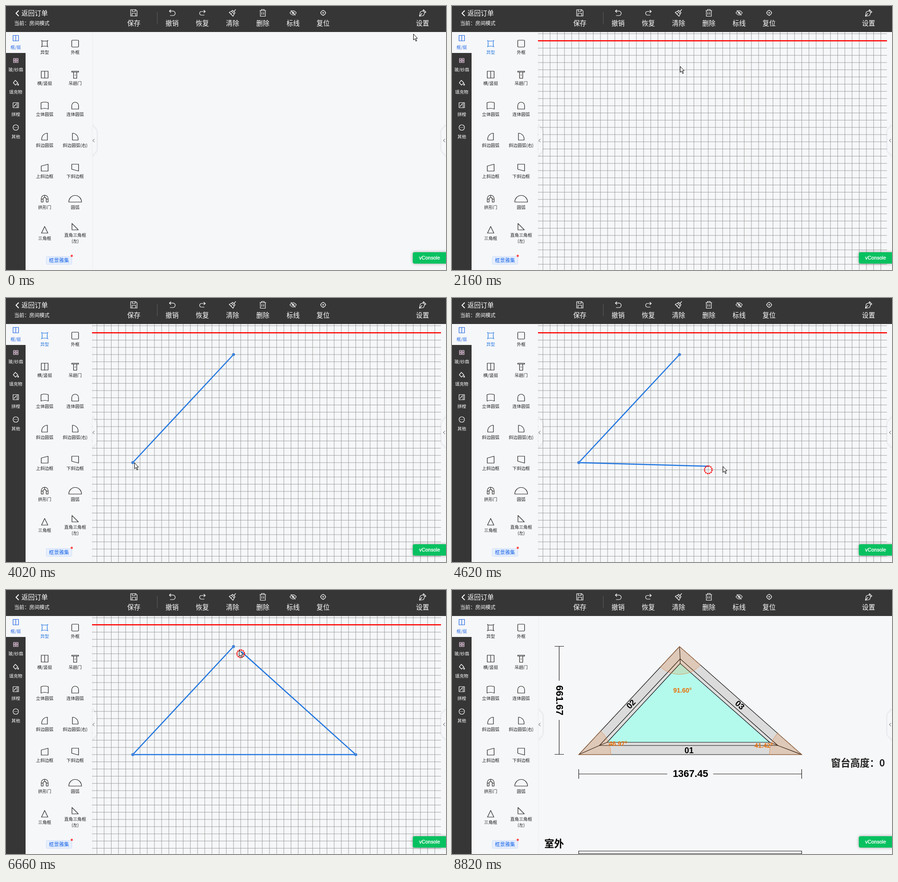
Recreate the animation shown at these times as an HTML page. Size 967x579 px, loop 8880 ms.

```html
<!DOCTYPE html>
<html lang="zh-CN">
<head>
<meta charset="utf-8">
<title>房间模式</title>
<style>
html, body { margin: 0; width: 100%; height: 100%; overflow: hidden; background: #f6f7f9; }
svg { display: block; width: 967px; height: 579px; font-family: "Noto Sans CJK SC", "Noto Sans CJK", sans-serif; }
.icon { fill: none; stroke: currentColor; stroke-width: 1.2; stroke-linejoin: round; }
.num { font-family: "Liberation Sans", Arial, sans-serif; font-weight: bold; }
</style>
</head>
<body>
<svg id="stage" viewBox="0 0 967 579"></svg>
<script>
const LOOP = 8880, STEP = 60, CELL = 15.8;
const BG = '#f6f7f9', DARK = '#363636', INK = '#222', BLUE = '#2468e5', PEN = '#2277e0';
const A = [500, 124], B = [278.6, 361], C = [768.6, 361];

const text = (x, y, s, size, fill = INK, extra = 'text-anchor="middle"') =>
  `<text x="${x}" y="${y + size * .37}" font-size="${size}" fill="${fill}" ${extra}>${s}</text>`;
const icon = (x, y, d, color = INK, extra = '') =>
  `<path class="icon" transform="translate(${x} ${y})" d="${d}" color="${color}" ${extra}/>`;
const path = (d, fill, stroke = 'none', width = 1) =>
  `<path d="${d}" fill="${fill}" stroke="${stroke}" stroke-width="${width}"/>`;
const rect = (x, y, w, h, fill, extra = '') =>
  `<rect x="${x}" y="${y}" width="${w}" height="${h}" fill="${fill}" ${extra}/>`;
const poly = (...p) => 'M' + p.join('L') + 'Z';

const LEFT_TAB = 'M190 260C190 268 199 267 199 277V313C199 323 190 322 190 330Z';
const RIGHT_TAB = 'M967 260C967 268 957 267 957 277V313C957 323 967 322 967 330Z';

function header() {
  const white = '#fff';
  const tools = [
    [281, '保存', 'M-7-7H4L7-4V7H-7ZM-3.5-7V-3H3V-7M-4 7V1H4V7'],
    [365, '撤销', 'M-2.5-7L-6-3.8L-2.5-.5M-6-3.8H2A4.8 4.8 0 0 1 2 6H-4.5'],
    [431.5, '恢复', 'M3-6L6.5-3L3 0M6.5-3H-2A4 4 0 0 0-2 5H4.5'],
    [498, '清除', 'M7-7.5L3-3M0-5.5L5.5 0L3.5 2.5L-2.5-3.5ZM-2.5-3.5L-7.5-1L1 7.5L3.5 2.5M-3.5 2.5L-2 1'],
    [564.5, '删除', 'M-7-5H7M-3-5V-7.5H3V-5M-5.5-5V7.5H5.5V-5M-2-1.5V4M2-1.5V4'],
    [631, '标线', 'M-7 0Q0-9.5 7 0Q0 9.5-7 0ZM-2 0A2 2 0 0 1 2 0A2 2 0 0 1-2 0M-5-5.5L5 5.5'],
    [697, '复位', 'M-5 0A5 5 0 0 1 5 0A5 5 0 0 1-5 0M0-6.5V-4M0 6.5V4M-6.5 0H-4M6.5 0H4M-1 0A1 1 0 0 1 1 0A1 1 0 0 1-1 0'],
    [915.5, '设置', 'M2-7L7.5-1.5L5-.5L2 6L-7 7.5L-5-2L1-4.5ZM-7 7.5L-1 1M1-4.5L5-.5']
  ];
  return rect(0, 0, 967, 57, DARK) + icon(25, 16, 'M3-6L-3 0L3 6', white, 'style="stroke-width:1.8"') +
    text(34, 15.5, '返回订单', 14.5, white, '') + text(18, 38, '当前：房间模式', 11.1, white, '') +
    path('M332.5 13V40', 'none', '#5c5c5c') +
    tools.map(([x, s, d]) => icon(x, 15, d, white) + text(x, 37.5, s, 14.4, white)).join('');
}

function sidebar() {
  const tabs = [
    ['框/挺', 'M-6-6H6V6H-6ZM0-6V6'],
    ['玻/纱扇', 'M-5-4.5H-1V4.5H-5ZM1-4.5H5V4.5H1ZM-3-2V2M3-2V2'],
    ['填充物', 'M-1-5.5L4.5 0L-.5 5L-5.5 0ZM5 2Q7.5 5 5 5.5Q3 5 5 2'],
    ['拼樘', 'M-6-5.5H3V5.5H-6ZM3-5.5H6V5.5H3M-4 3L1-3'],
    ['其他', 'M-6 0A6 6 0 0 1 6 0A6 6 0 0 1-6 0M-3.5 0H-2M-.7 0H.7M2 0H3.5']
  ];
  const label = 'text-anchor="middle" font-weight="500"';
  return rect(0, 57, 43, 522, DARK) + rect(0, 57, 43, 46, BG) + tabs.map(([s, d], i) => {
    const color = i ? '#fff' : BLUE;
    return icon(21.5, 70.5 + i * 49, d, i == 1 ? '#f5d3ee' : color) + text(21.5, 90 + i * 49, s, 9.6, color, label);
  }).join('');
}

function panel() {
  const items = [
    ['异型', 'M-6-6Q0-5 6-6Q5 0 6 6Q0 5-6 6Q-5 0-6-6ZM-7.5-7.5L-6-6M7.5-7.5L6-6M-7.5 7.5L-6 6M7.5 7.5L6 6'],
    ['外框', 'M-6-7.5H6Q7.5-7.5 7.5-6V6Q7.5 7.5 6 7.5H-6Q-7.5 7.5-7.5 6V-6Q-7.5-7.5-6-7.5Z'],
    ['横/竖挺', 'M-7.5-7.5H7.5V7.5H-7.5ZM0-7.5V7.5'],
    ['吊趟门', 'M-7.5-7.5H7.5V-5.5H-7.5ZM-3.5-5.5V8H3.5V-5.5M-1 1H1.5'],
    ['立体圆弧', 'M-8-6.5Q0-9 8-6.5V7.5Q0 4.5-8 7.5Z'],
    ['连体圆弧', 'M-7.5 7.5V0A7.5 7.5 0 0 1 7.5 0V7.5Z'],
    ['斜边圆弧', 'M6-7.5V7.5H-6.5V5A12.5 12.5 0 0 1 6-7.5Z'],
    ['斜边圆弧(右)', 'M-6-7.5V7.5H6.5V5A12.5 12.5 0 0 0-6-7.5Z'],
    ['上斜边框', 'M-7.5-3.5L7.5-7.5V7.5H-7.5Z'],
    ['下斜边框', 'M-7.5-7.5H7.5V7.5L-7.5 3.5Z'],
    ['拱形门', 'M-7.5 7.5V0A7.5 7.5 0 0 1 7.5 0V7.5H3.5V1A3.5 3.5 0 0 0-3.5 1V7.5ZM-7.5 1H-3.5M3.5 1H7.5M0-2.5V-7.5'],
    ['圆弧', 'M-14 7.5A14 14.5 0 0 1 14 7.5Z'],
    ['三角框', 'M0-7L7 7.5H-7Z'],
    ['直角三角框', 'M-7-7V7H7Z']
  ];
  return rect(43, 57, 146, 522, BG) + path(LEFT_TAB, BG) + path(RIGHT_TAB, BG) +
    icon(192.5, 295, 'M2-3.5L-2 0L2 3.5', '#555', 'style="stroke-width:1"') +
    icon(963, 295, 'M2-3.5L-2 0L2 3.5', '#555', 'style="stroke-width:1"') +
    items.map(([s, d], i) => {
      const x = i % 2 ? 152 : 85, y = 82.5 + (i >> 1) * 68, up = i == 13 ? 6.5 : 0;
      const part = icon(x, y - up, d, 'currentColor') + text(x, y + 18.7 - up, s, 9.6, 'currentColor');
      return `<g ${i ? '' : 'id="shape"'} color="${INK}">${part}</g>`;
    }).join('') + text(152, 515.5, '(左)', 9.6) +
    rect(88.5, 549.5, 56, 17, '#e7effc', 'stroke="#cbdcf9" rx="2"') + text(116.5, 558, '框景雅集', 11.1, '#1a66e8') +
    '<circle cx="144.5" cy="548" r="2.4" fill="#f44"/>';
}

function grid() {
  let d = '';
  for (let x = A[0] - 19 * CELL; x < 956; x += CELL) d += `M${x} 57V579`;
  for (let y = A[1] - 4 * CELL; y < 579; y += CELL) d += `M189 ${y}H956`;
  return '<g id="grid">' + path(d, 'none', '#8c8c8c', .8) +
    path('M189 76.2H956', 'none', '#f00', 2.4) + '</g>';
}

// Angle marker at p, from the side towards q to the side towards s
function sector(p, q, s, r) {
  const along = to => {
    const k = r / Math.hypot(to[0] - p[0], to[1] - p[1]);
    return [p[0] + (to[0] - p[0]) * k, p[1] + (to[1] - p[1]) * k];
  };
  return path(`M${p}L${along(q)}A${r} ${r} 0 0 0 ${along(s)}Z`, 'rgba(235,115,20,.17)', '#e08a4a', .8);
}

function product() {
  const inner = [[501.5, 151], [324, 341], [716, 341]], glass = [[501.5, 161], [341, 334], [698, 334]];
  const num = (x, y, s, size, fill = '#000', turn = 0) =>
    text(x, y, s, size, fill, `class="num" text-anchor="middle" transform="rotate(${turn} ${x} ${y})"`);
  const miters = [A, B, C].map((p, i) => `M${p}L${inner[i]}L${glass[i]}`).join('');
  const bold = 'font-weight="bold"';
  return '<g id="product">' +
    path(poly(A, B, C), '#dbdbdb', '#111', 1.2) + path(poly(...inner), '#dedede', '#111', 1.2) +
    path(poly(...glass), '#b3faec', '#111', 1.2) + path(miters, 'none', '#111', 1.2) +
    sector(A, B, C, 61) + sector(B, C, A, 70.5) + sector(C, A, B, 71) +
    num(506.5, 219.5, '91.60°', 14, '#e8710a') + num(365, 337, '46.97°', 14, '#e8710a') +
    num(685, 341, '41.42°', 14, '#e8710a') +
    num(521, 351, '01', 18) + num(393, 250, '02', 18, '#000', -47) + num(633, 252, '03', 18, '#000', 41.4) +
    path('M225.5 123.5H246M225.5 360.5H246M235.5 124V199M235.5 285V361', 'none', '#222', 1.2) +
    path('M278.5 393V414M768.5 393V414M278 403.5H473M574 403.5H769', 'none', '#222', 1.2) +
    num(237, 242, '661.67', 21.5, '#000', 90) + num(524, 402, '1367.45', 21.5) +
    text(833, 379, '窗台高度：0', 21.2, INK, bold) + text(203, 556, '室外', 21.5, '#000', bold) +
    path('M278.5 579V572.5H768.5V579M278.5 578.5H768.5', 'none', '#222', 1.2) + '</g>';
}

const stage = document.getElementById('stage');
stage.innerHTML = rect(0, 0, 967, 579, BG) +
  path('M190.5 57V579', 'none', '#f0f1f3', 2) + path(LEFT_TAB + RIGHT_TAB, BG, '#ebecef', 6) +
  grid() + panel() + sidebar() + product() +
  `<path id="lines" fill="none" stroke="${PEN}" stroke-width="2.5"/><g id="dots"></g>` +
  '<circle id="snap" r="8.3" fill="none" stroke="#f00" stroke-width="2.4" stroke-dasharray="3 1.35"/>' +
  header() +
  rect(894, 540, 77, 25, '#07c160', 'rx="4" style="filter:drop-shadow(0 0 3px rgba(0,0,0,.35))"') +
  text(931, 552, 'vConsole', 11, '#fff', 'text-anchor="middle" stroke="#fff" stroke-width=".35" font-family="Liberation Sans, Arial, sans-serif"') +
  '<path id="arrow" d="M.5.5V13.5L3.5 10.7L5.8 16.2L7.8 15.3L5.5 10H9.3Z" fill="#fff" stroke="#000" stroke-width="1"/>' +
  '<path id="hand" d="M-1.5 9V1.5Q0-.8 1.5 1.5V6Q3.5 4.7 4.3 6.5Q6.3 5.5 6.8 7.3Q8.8 6.7 8.8 9V12L7.3 16.5H-.5L-4.5 10.5Q-4.2 8-1.5 10Z" fill="#fff" stroke="#000" stroke-width="1.1"/>';
const $ = id => document.getElementById(id);
const show = (id, on) => $(id).style.display = on ? '' : 'none';

// Pointer track: time, x, y
const TRACK = [
  [0, 895, 61], [60, 855, 66], [180, 480, 110], [300, 150, 143], [360, 113, 137], [420, 103, 115], [480, 101, 101.5],
  [1380, 101, 101.5], [1500, 135, 130], [1740, 300, 169], [1980, 460, 152], [2160, 501, 132],
  [2340, 501, 132], [2580, 495, 126], [2760, 495, 126], [2820, 493, 135], [2880, 460, 180], [3000, 357, 291],
  [3060, 316, 319], [3180, 292, 346], [3420, 282, 361], [4200, 282, 361], [4260, 300, 363], [4380, 400, 368],
  [4560, 564, 369], [4620, 595, 369], [4800, 680, 367], [5100, 785, 361], [5160, 776, 359],
  [6060, 776, 359], [6180, 735, 326], [6420, 575, 186], [6600, 517, 135], [6660, 512, 132], [6900, 505, 126],
  [7080, 502, 123], [7980, 502, 123], [8100, 518, 138], [8340, 640, 166], [8580, 820, 120], [8760, 945, 52], [8820, 968, 44]
];
function pointer(t) {
  const i = TRACK.findIndex(k => k[0] > t);
  if (i < 0) return [968, 44];
  const [t0, x0, y0] = TRACK[i - 1], [t1, x1, y1] = TRACK[i], k = (t - t0) / (t1 - t0);
  return [x0 + (x1 - x0) * k, y0 + (y1 - y0) * k];
}

// Each click fixes a corner; the open side follows the pointer one step late
const CLICKS = [[2820, A], [4020, B], [5760, C]];
const MOVES = [[2880, 4020], [4260, 5760], [6120, 7440]];

function draw(t) {
  t = Math.floor(t / STEP) * STEP;
  const editing = t >= 1260 && t < 7440;
  const tip = pointer(t), end = pointer(Math.max(0, t - STEP));
  const fixed = editing ? CLICKS.filter(c => t >= c[0]).map(c => c[1]) : [];
  const moving = MOVES.some(([a, b]) => t >= a && t < b);
  const points = moving ? [...fixed, end] : fixed;

  show('grid', editing);
  show('product', t >= 7440);
  $('shape').setAttribute('color', editing ? PEN : INK);
  $('lines').setAttribute('d', points.length > 1 ? 'M' + points.join('L') : '');
  $('dots').innerHTML = fixed.map(([x, y]) => `<circle cx="${x}" cy="${y}" r="3.2" fill="#3f82d8"/>`).join('');
  show('snap', moving);
  const snapTo = (v, o) => o + Math.round((v - o) / CELL) * CELL;
  $('snap').setAttribute('transform', `translate(${snapTo(end[0], A[0])} ${snapTo(end[1], A[1])})`);

  const overItem = tip[0] < 110 && tip[1] < 120;
  show('hand', overItem);
  show('arrow', !overItem);
  $(overItem ? 'hand' : 'arrow').setAttribute('transform', `translate(${tip})`);
}

const start = performance.now();
function frame() {
  draw((performance.now() - start) % LOOP);
  requestAnimationFrame(frame);
}
frame();
</script>
</body>
</html>
```
